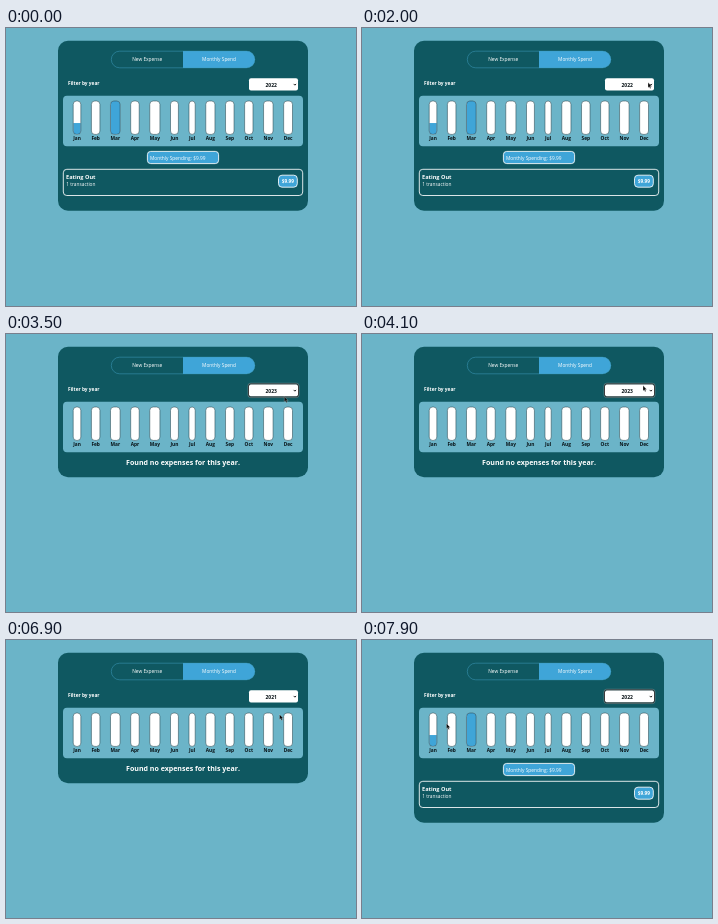
Write an HTML page that moves like this. It is 350 by 278 pixels and loops after 8000 ms.

```html
<!DOCTYPE html>
<html lang="en">
<head>
<meta charset="utf-8">
<title>Monthly spend</title>
<style>
  html, body { margin: 0; width: 100%; height: 100%; overflow: hidden; background: #6bb4c8; }
  svg { display: block; width: 350px; height: 278px; }
  text { font: 4.8px "Open Sans", "Noto Sans", sans-serif; fill: #fff; }
  .bold { font-weight: 700; }
  .mid { text-anchor: middle; }
  .dark { fill: #081216; }
  .blue { fill: #3fa5d8; }
  .framed { stroke: #fff; stroke-width: .85; }
  .bar { fill: #fff; }
  .edge { fill: none; stroke: #294951; stroke-width: .55; }
</style>
</head>
<body>
<svg viewBox="0 0 350 278">
  <rect width="350" height="278" fill="#6bb4c8"/>
  <rect id="card" x="52" y="12.8" width="250" height="170" rx="10" fill="#0f5861"/>

  <path class="blue" d="M177 23H240.5a8.500 8.500 0 0 1 0 17H177Z"/>
  <rect x="105.300" y="23.200" width="143.400" height="16.600" rx="8.300" fill="none" stroke="#3f9cbf" stroke-width=".5"/>
  <text class="mid" x="141.200" y="33.400">New Expense</text>
  <text class="mid" x="213" y="33.400">Monthly Spend</text>

  <text class="bold" x="62" y="57.200">Filter by year</text>
  <rect x="243" y="50.300" width="49" height="12.300" rx="2" fill="#fff"/>
  <g id="ring" fill="none">
    <rect x="242.500" y="49.800" width="50" height="13.200" rx="2.200" stroke="#2b2b2b" stroke-width="1"/>
    <rect x="241.900" y="49.200" width="51.200" height="14.400" rx="2.700" stroke="#9aa5a6" stroke-width=".4"/>
  </g>
  <text id="year" class="bold mid dark" x="265.200" y="58.500" style="font-size:5px">2022</text>
  <path d="M287.700 55.900l1.200 1.300 1.200-1.300" fill="none" stroke="#111" stroke-width=".9"/>

  <rect x="57" y="67.800" width="240" height="50.500" rx="4" fill="#6bb4c8"/>
  <g id="bars"></g>

  <g id="spent">
    <rect class="blue framed" x="141.400" y="123.400" width="71.200" height="12.200" rx="3.300"/>
    <text x="144" y="131.500">Monthly Spending: $9.99</text>
    <rect class="framed" x="57.300" y="141.300" width="239.400" height="26.200" rx="3.500" fill="none"/>
    <text class="bold" x="60" y="151" style="font-size:5.6px">Eating Out</text>
    <text x="60.300" y="158">1 transaction</text>
    <rect class="blue framed" x="272.500" y="147.200" width="18.800" height="12" rx="3.500"/>
    <text class="bold mid" x="281.900" y="155.100">$9.99</text>
  </g>
  <text id="none" class="bold mid" x="177" y="130.800" style="font-size:7.05px">Found no expenses for this year.</text>

  <path id="cursor" d="M0 0V5.300L1.200 4.200 2 6.100 3 5.700 2.200 3.900H3.800Z" fill="#0a0a0a" stroke="#fff" stroke-width=".25"/>
</svg>
<script>
const LOOP = 8000, STEP = 100;
const $ = id => document.getElementById(id);

const MONTHS = 'Jan Feb Mar Apr May Jun Jul Aug Sep Oct Nov Dec'.split(' ');
const SHARE = { Jan: .34, Mar: 1 };
const LEFT = 67.2, RIGHT = 286.5, TOP = 73, TALL = 33.4;

// Each bar is as wide as its label; equal gaps share the rest of the row.
function buildBars() {
  const bars = $('bars');
  bars.innerHTML = MONTHS.map(m => `<text class="bold">${m}</text>`).join('');
  const widths = [...bars.children].map(el => el.getComputedTextLength());
  const total = widths.reduce((a, b) => a + b);
  const gap = (RIGHT - LEFT - total) / (MONTHS.length - 1);
  let x = LEFT;
  bars.innerHTML = MONTHS.map((name, i) => {
    const w = widths[i], fill = TALL * (SHARE[name] || 0);
    const box = `x="${x}" y="${TOP}" width="${w}" height="${TALL}" rx="3.4"`;
    const part = `<clipPath id="clip${name}"><rect ${box}/></clipPath>
      <rect class="blue fill" clip-path="url(#clip${name})" x="${x}"
        y="${TOP + TALL - fill}" width="${w}" height="${fill}"/>`;
    const label = `<text class="bold mid dark" x="${x + w / 2}" y="111.8">${name}</text>`;
    x += w + gap;
    return `<rect class="bar" ${box}/>${fill ? part : ''}<rect class="edge" ${box}/>${label}`;
  }).join('');
}
buildBars();
const fills = document.querySelectorAll('.fill');

// Pointer moves: start, end, x, y
const ENTER = 300;
const MOVES = [
  [ENTER, 1000, 201, 62.5], [1000, 1500, 286, 54.5], [2600, 3100, 277.6, 65.4],
  [3400, 4100, 281, 51.6], [4500, 5100, 274.5, 81], [5500, 6200, 282, 53.5],
  [6300, 6900, 273.5, 74.4], [6900, 7900, 84.5, 83.5]
];
const easeOut = k => 1 - (1 - k) ** 1.5;

function pointAt(t) {
  let x = 56, y = 104;
  for (const [from, to, x1, y1] of MOVES) {
    const k = easeOut(Math.min(1, Math.max(0, (t - from) / (to - from))));
    x += (x1 - x) * k;
    y += (y1 - y) * k;
  }
  return [x, y];
}

// Picking a year focuses the menu; reopening it drops the ring.
const STATES = [
  [0, 2022, false], [3500, 2023, true], [4400, 2023, false],
  [5400, 2021, true], [6200, 2021, false], [7000, 2022, true]
];

function show(el, on) { el.style.display = on ? '' : 'none'; }

function draw(now) {
  const t = Math.floor((now % LOOP) / STEP) * STEP;
  const [, year, focus] = STATES.filter(s => s[0] <= t).pop();
  const spent = year === 2022;
  $('year').textContent = year;
  $('card').setAttribute('height', spent ? 170 : 130.5);
  show($('ring'), focus);
  show($('spent'), spent);
  show($('none'), !spent);
  fills.forEach(f => show(f, spent));
  show($('cursor'), t >= ENTER);
  $('cursor').setAttribute('transform', `translate(${pointAt(t)})`);
}

const start = performance.now();
function tick() {
  draw(performance.now() - start);
  requestAnimationFrame(tick);
}
tick();
</script>
</body>
</html>
```
